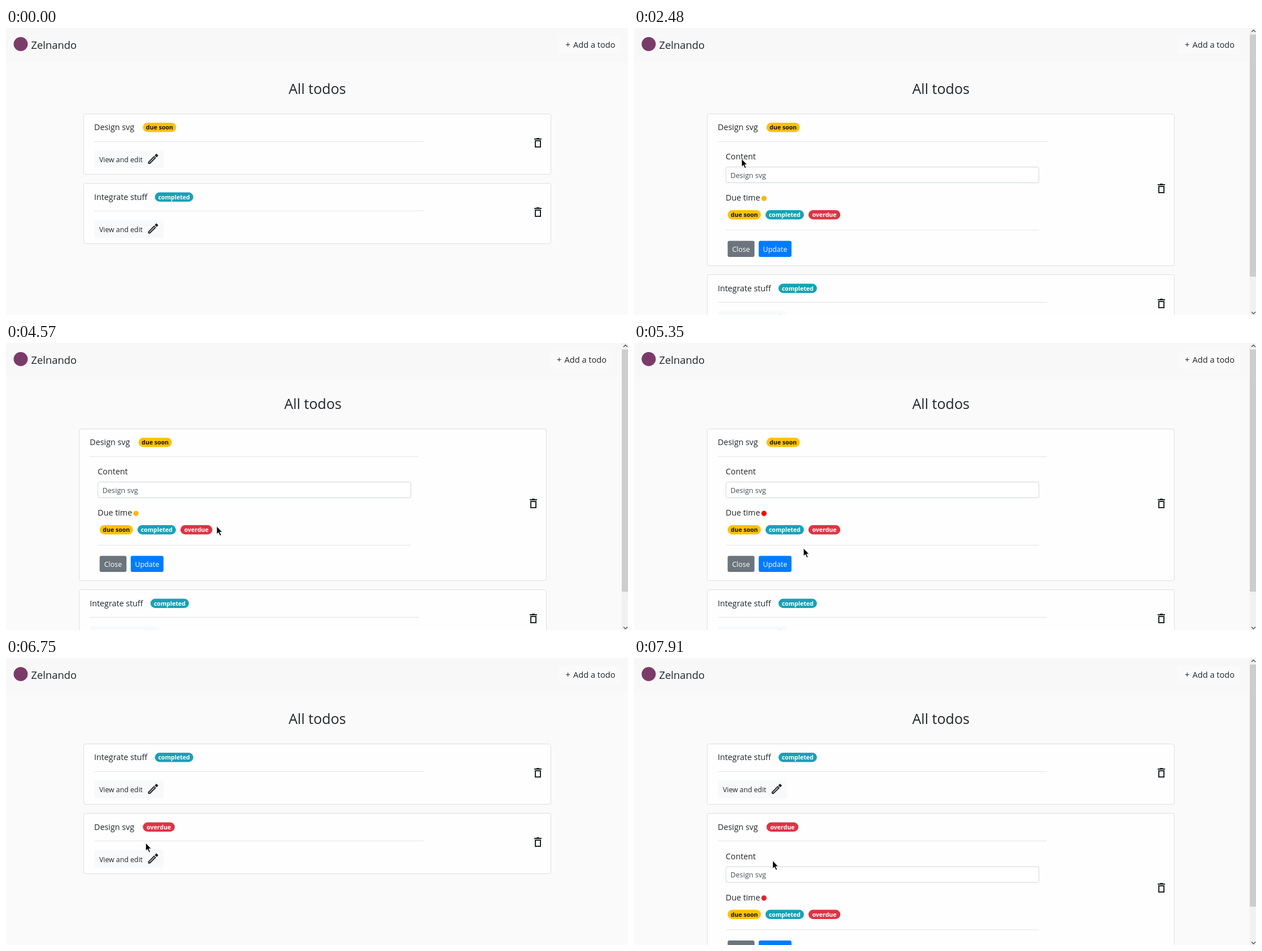
These frames come from a looping animation (1101x509 px, 8 s). An HTML page:

```html
<!DOCTYPE html>
<html lang="en">
<head>
<meta charset="utf-8">
<title>Todo list</title>
<style>
  html, body { margin: 0; width: 100%; height: 100%; overflow: hidden; background: #fafafa; }
  svg { display: block; width: 1101px; height: 509px; }
  text { font-family: "Open Sans", "Noto Sans", sans-serif; fill: #212529; white-space: pre; }
  .middle { text-anchor: middle; }
  .bold { font-weight: 700; }
</style>
</head>
<body>
<svg id="stage" viewBox="0 0 1101 509" xmlns="http://www.w3.org/2000/svg"></svg>
<script>
const LOOP = 8000;
const INK = '#212529';
const CARD_HEIGHT = 108;
const FORM_HEIGHT = 162;
const CARD_GAP = 15.5;
const BADGES = {
  'due soon': { width: 59, fill: '#ffc107', ink: '#111' },
  'completed': { width: 68, fill: '#17a2b8', ink: '#fff' },
  'overdue': { width: 56.5, fill: '#dc3545', ink: '#fff' }
};

const text = (x, y, size, label, cls = '', ink = INK) =>
  `<text x="${x}" y="${y}" font-size="${size}" class="${cls}" style="fill:${ink}">${label}</text>`;
const rect = (x, y, w, h, fill, attrs = '') =>
  `<rect x="${x}" y="${y}" width="${w}" height="${h}" fill="${fill}" ${attrs}/>`;
const line = (d, color, width) =>
  `<path d="${d}" fill="none" stroke="${color}" stroke-width="${width}"/>`;
const group = (x, y, content, extra = '') =>
  `<g transform="translate(${x} ${y}) ${extra}">${content}</g>`;
const rule = (x, y, w) => rect(x, y, w, 1, '#e4e4e4');

const trash = (x, y) => group(x, y,
  line('M0 2H13M4 1H9', INK, 2) + line('M2 5V16H11V5Z', INK, 2));

// drawn along its axis, then turned so that the point is at the lower left
const pencil = (x, y) => group(x, y,
  `<path d="M0 0L2.5-2.5H17.5V2.5H2.5Z" fill="${INK}"/>` +
  line('M3 0H16', '#f8f9fa', 1.2) + rect(18.8, -2.5, 4.5, 5, INK, 'rx="1"'), 'rotate(-45)');

function badge(x, y, label) {
  const { width, fill, ink } = BADGES[label];
  return rect(x, y, width, 16.5, fill, 'rx="8.25"') +
    text(x + width / 2, y + 12.2, 10.6, label, 'middle bold', ink);
}

function badgeRow(x, y) {
  return Object.keys(BADGES).map(label => {
    const item = badge(x, y, label);
    x += BADGES[label].width + 8;
    return item;
  }).join('');
}

const button = (x, y, w, label, fill, cls) =>
  rect(x, y, w, 28.5, fill, `rx="3" class="${cls}"`) +
  text(x + w / 2, y + 19.2, 12.5, label, 'middle', '#fff');

const viewButton = () =>
  rect(19, 65, 123, 31.5, '#f8f9fa', 'rx="3" class="view"') +
  text(28, 86, 12.3, 'View and edit') + pencil(114.5, 89);

const editForm = title =>
  text(33, 81, 14.3, 'Content') +
  rect(33.5, 94.5, 554, 28, '#fff', 'rx="3" stroke="#ced4da"') +
  text(41.5, 113.7, 12.7, title, '', '#495057') +
  text(33, 154, 14.3, 'Due time') +
  '<circle class="dot" cx="100.8" cy="150.3" r="4.7"/>' +
  badgeRow(36.5, 171) + rule(33.5, 206, 554) +
  button(36.5, 225.5, 47.5, 'Close', '#6c757d', 'close') +
  button(91.5, 225.5, 58, 'Update', '#007bff', 'update');

function card(x, y, { title, status, badgeX }, open) {
  const height = CARD_HEIGHT + (open ? FORM_HEIGHT : 0);
  const frame = rect(.5, .5, 827, height - 1, '#fefefe', 'rx="3.5" stroke="#dfdfdf"') +
    rule(19, 49, 583) + trash(798, 43 + (height - CARD_HEIGHT) / 2);
  const content = text(19, 29, 14.3, title) + badge(badgeX, 16, status) +
    (open ? editForm(title) : viewButton());
  return group(Math.floor(x), Math.floor(y), frame) + group(x, y, content);
}

const scrollbar = () =>
  rect(1089.5, 0, 12, 509, '#f1f1f1') + rect(1090, 11.5, 11, 429.5, '#cdcdcd') +
  line('M1093 7l3.5-3.5 3.5 3.5M1093 503.5l3.5 3.5 3.5-3.5', '#555', 1.5);

function scene(cards, openIndex) {
  const scrolls = openIndex >= 0;
  const shift = scrolls ? -15.5 : 0;
  let y = 152;
  let body = rect(0, 0, 1101, 60, '#f8f8f8') +
    '<circle cx="26" cy="28.5" r="12.5" fill="#7b3b69"/>' + text(44.5, 37, 18.4, 'Zelnando') +
    rect(977 + shift, 14, 111, 32, '#fafafa', 'rx="3"') +
    text(990.5 + shift, 35, 14.6, '+') + text(1004 + shift, 35, 14.6, 'Add a todo') +
    text(551 + shift / 2, 116.5, 25.1, 'All todos', 'middle');
  cards.forEach((item, i) => {
    const open = i === openIndex;
    body += card(137 + shift / 2, y, item, open);
    y += CARD_HEIGHT + CARD_GAP + (open ? FORM_HEIGHT : 0);
  });
  return `<g class="scene">${body}${scrolls ? scrollbar() : ''}</g>`;
}

const design = { title: 'Design svg', status: 'due soon', badgeX: 105.3 };
const integrate = { title: 'Integrate stuff', status: 'completed', badgeX: 126.5 };
const before = [design, integrate];
const after = [integrate, { ...design, status: 'overdue' }];

const TIMELINE = [
  { from: 0, cards: before, open: -1 },
  { from: 2480, cards: before, open: 0 },
  { from: 6120, cards: after, open: -1 },
  { from: 7910, cards: after, open: 1 }
];
const CLICKS = [2160, 4950, 5890, 7680];
const CLICK_LENGTH = 140;
const OVERDUE_PICKED = 5100;

const ENTRY = { time: 290, x: 1033, y: 464 };
const MOVES = [
  { start: 290, end: 520, x: 1018, y: 407 },
  { start: 1000, end: 1300, x: 182, y: 486 },
  { start: 1300, end: 1780, x: 190.5, y: 232 },
  { start: 2900, end: 3400, x: 364, y: 333 },
  { start: 3400, end: 4090, x: 290, y: 326 },
  { start: 4250, end: 4400, x: 373.5, y: 325 },
  { start: 4570, end: 4720, x: 342.5, y: 328.5 },
  { start: 5200, end: 5820, x: 258, y: 399 },
  { start: 6450, end: 6750, x: 247.3, y: 328 },
  { start: 6900, end: 7360, x: 245.5, y: 359.5 }
];

const stage = document.getElementById('stage');
stage.innerHTML = TIMELINE.map(({ cards, open }) => scene(cards, open)).join('') +
  `<g id="pointer">
    <circle id="press" r="11.2" fill="#ff0" fill-opacity=".47"/>
    <path d="M0 0V14L3.2 11.2 5.8 16.7 8 15.7 5.5 10.3H9.7Z" stroke="#fff" stroke-width=".8"/>
  </g>`;

const scenes = [...stage.querySelectorAll('.scene')];
const pointer = document.getElementById('pointer');
const press = document.getElementById('press');
const dots = stage.querySelectorAll('.dot');
const hoverables = ['view', 'update'].flatMap(cls => [...stage.querySelectorAll('.' + cls)]
  .map(node => ({ node, idle: node.getAttribute('fill'), hover: cls === 'view' ? '#e2e6ea' : '#0062cc' })));

const easeOut = k => 1 - (1 - k) ** 2.5;
const clamp = k => Math.min(1, Math.max(0, k));

function pointerAt(t) {
  return MOVES.reduce((at, { start, end, x, y }) => {
    const k = easeOut(clamp((t - start) / (end - start)));
    return { x: at.x + (x - at.x) * k, y: at.y + (y - at.y) * k };
  }, ENTRY);
}

const show = (node, on) => node.setAttribute('display', on ? 'inline' : 'none');

function isUnder(node, { x, y }) {
  const box = node.getBoundingClientRect();
  return x >= box.left && x <= box.right && y >= box.top && y <= box.bottom;
}

function render(t) {
  const current = TIMELINE.filter(({ from }) => from <= t).length - 1;
  scenes.forEach((node, i) => show(node, i === current));

  const tip = pointerAt(t);
  show(pointer, t >= ENTRY.time);
  pointer.setAttribute('transform', `translate(${tip.x} ${tip.y})`);
  show(press, CLICKS.some(click => t >= click && t < click + CLICK_LENGTH));

  hoverables.forEach(({ node, idle, hover }) =>
    node.setAttribute('fill', t >= ENTRY.time && isUnder(node, tip) ? hover : idle));
  dots[0].setAttribute('fill', t < OVERDUE_PICKED ? '#ffb70f' : '#f00');
  dots[1].setAttribute('fill', '#e0252d');
}

const begin = performance.now();
function tick() {
  render((performance.now() - begin) % LOOP);
  requestAnimationFrame(tick);
}
tick();
</script>
</body>
</html>
```
